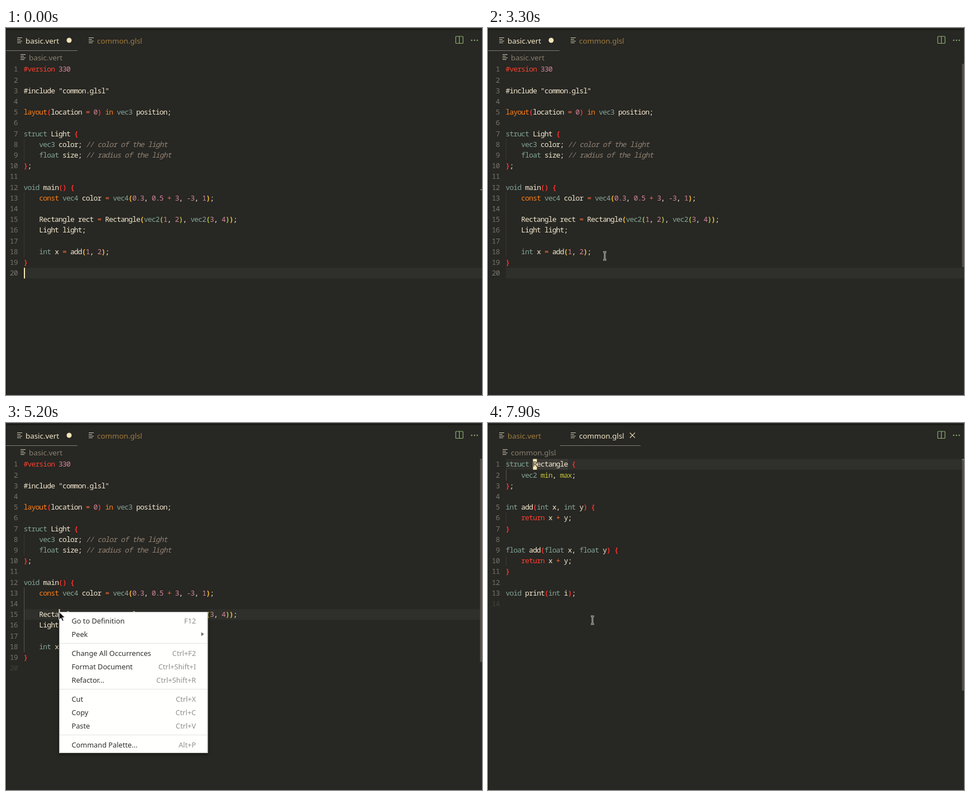
An HTML page that plays this animation: 852x657 px, repeating every 8000 ms.

```html
<!DOCTYPE html>
<html lang="en">
<head>
<meta charset="utf-8">
<title>Go to definition</title>
<style>
html, body { margin: 0; width: 100%; height: 100%; overflow: hidden; background: #272723; }
svg { display: block; }
text { white-space: pre; }
/* Tight spacing trails each glyph, so shift left by half of it to centre the cells. */
.code { transform: translateX(-.4px); }
.code text { font: 500 13px "Noto Sans Mono", monospace; letter-spacing: -.86px; fill: #f5ead0; }
.code .num { fill: #78736a; font-weight: 400; text-anchor: end; }
.code .dim { fill: #43413b; }
.code .under { fill: #272723; }
.ui { font: 13.35px "Noto Sans", sans-serif; }
.item { font: 12.75px "Noto Sans", sans-serif; fill: #2f2f2d; }
.key { fill: #8f8f8d; text-anchor: end; }
.active { fill: #f5e8c8; }
.idle { fill: #a07c3c; }
.crumb { fill: #8a8070; }
.type { fill: #83a598; }
.word { fill: #fe8019; }
.flow { fill: #fb4030; }
.call { fill: #c5c83a; }
.lit { fill: #d3869b; }
.op { fill: #fb6a3a; }
.note { fill: #928374; font-style: italic; font-weight: 400; }
.b0 { fill: #f5302a; }
.b1 { fill: #fabd2f; }
.b2 { fill: #a9c23c; }
.b0, .b1, .b2 { font-weight: 600; }
.edge { fill: #151513; }
.row { fill: #2f2f2b; }
.same { fill: #3b3a36; }
.pair { fill: #665c54; }
.guide { fill: #3a3934; }
.bright { fill: #5b5850; }
.caret { fill: #fbe9b5; }
.mark { fill: #7f7b70; }
.bar { fill: #57504a; }

.doc1, .doc2, .before, .after, .blink, .blink2, .bar1, .menu, .hover, .closed, .ibeam, .line15 {
  animation: 8s step-end infinite;
}
.doc1 { animation-name: doc1; }
.doc2 { animation-name: doc2; }
.before { animation-name: before; }
.after { animation-name: after; }
.blink { animation-name: blink; }
.blink2 { animation-name: blink2; }
.line15 { animation-name: line15; }
.bar1 { animation-name: bar; }
.menu { animation-name: menu; }
.hover { animation-name: hover; }
.closed { animation-name: closed; }
.ibeam { animation-name: ibeam; }
.pointer { animation: move 8s step-end infinite; }

@keyframes doc1 { 0% { opacity: 1 } 87.5% { opacity: 0 } }
@keyframes doc2 { 0% { opacity: 0 } 87.5% { opacity: 1 } }
@keyframes before { 0% { opacity: 1 } 65% { opacity: 0 } }
@keyframes after { 0% { opacity: 0 } 65% { opacity: 1 } }
@keyframes blink {
  0%, 6.25%, 17.5%, 31.25%, 43.75%, 55% { opacity: 1 }
  1.25%, 11.25%, 25%, 37.5%, 50%, 61.25% { opacity: 0 }
}
@keyframes blink2 { 0%, 98.75% { opacity: 1 } 93.75% { opacity: 0 } }
@keyframes line15 { 0%, 71.25% { opacity: 0 } 65% { opacity: 1 } }
@keyframes bar { 0%, 86.25% { opacity: 0 } 25% { opacity: 1 } }
@keyframes menu { 0%, 86.25% { opacity: 0 } 65% { opacity: 1 } }
@keyframes hover { 0% { opacity: 0 } 70% { opacity: 1 } }
@keyframes closed { 0% { opacity: 0 } 86.25% { opacity: 1 } }
@keyframes ibeam { 0%, 65% { opacity: 0 } 25%, 86.25% { opacity: 1 } }
@keyframes move {
  0% { transform: translate(205px, 652px) }
  25% { transform: translate(205px, 652px); animation-timing-function: steps(2) }
  27.5% { transform: translate(205px, 630px) }
  30% { transform: translate(205px, 630px); animation-timing-function: steps(3) }
  33.75% { transform: translate(206px, 572px); animation-timing-function: steps(3) }
  37.5% { transform: translate(208px, 446px); animation-timing-function: steps(3) }
  41.25% { transform: translate(209px, 408px) }
  42.5% { transform: translate(209px, 408px); animation-timing-function: steps(3) }
  46.25% { transform: translate(199px, 402px); animation-timing-function: steps(3) }
  50% { transform: translate(164px, 372px); animation-timing-function: steps(3) }
  53.75% { transform: translate(117px, 342px) }
  55% { transform: translate(95px, 338px) }
  66.25% { transform: translate(95px, 338px); animation-timing-function: steps(4) }
  71.25% { transform: translate(118px, 344px); animation-timing-function: steps(4) }
  76.25% { transform: translate(172px, 351px); animation-timing-function: steps(4) }
  81.25%, 100% { transform: translate(187px, 353px) }
}
</style>
</head>
<body>
<svg id="stage" width="852" height="657" viewBox="0 0 852 657"></svg>
<script>
const BASIC = `#version 330

#include "common.glsl"

layout(location = 0) in vec3 position;

struct Light {
    vec3 color; // color of the light
    float size; // radius of the light
};

void main() {
    const vec4 color = vec4(0.3, 0.5 + 3, -3, 1);

    Rectangle rect = Rectangle(vec2(1, 2), vec2(3, 4));
    Light light;

    int x = add(1, 2);
}
`;
const COMMON = `struct Rectangle {
    vec2 min, max;
};

int add(int x, int y) {
    return x + y;
}

float add(float x, float y) {
    return x + y;
}

void print(int i);
`;
const MENU = [
  [354, 'Go to Definition', 'F12'], [378, 'Peek', ''],
  [412, 'Change All Occurrences', 'Ctrl+F2'], [436, 'Format Document', 'Ctrl+Shift+I'],
  [460, 'Refactor...', 'Ctrl+Shift+R'], [494, 'Cut', 'Ctrl+X'], [518, 'Copy', 'Ctrl+C'],
  [542, 'Paste', 'Ctrl+V'], [576, 'Command Palette...', 'Alt+P']
];
const LEFT = 32, CHAR = 6.94, TOP = 64.4, LINE = 19.2, BASE = 14;
const TOKEN = /(?<note>\/\/.*)|(?<type>\b(?:vec\d|float|int|struct|void)\b)|(?<word>\b(?:layout|in|const)\b)|(?<flow>#version|\breturn\b)|(?<call>\b(?:min|max)\b)|(?<lit>-?\b\d[\d.]*|-\d)|(?<op>[=+])|(?<open>[({])|(?<close>[)}])/g;

const rowY = n => TOP + (n - 1) * LINE;
const rect = (x, y, w, h, cls) => `<rect x="${x}" y="${y}" width="${w}" height="${h}" class="${cls}"/>`;
const text = (x, y, s, cls = '') => `<text x="${x}" y="${y}" class="${cls}">${s}</text>`;
const cells = (n, col, count, cls) => rect(LEFT + col * CHAR, rowY(n), count * CHAR, LINE, cls);
const row = n => rect(LEFT, rowY(n), 852 - LEFT, LINE, 'row');
const guide = (from, to, cls = 'guide') => rect(LEFT, rowY(from), 1, (to - from + 1) * LINE, cls);
const group = (cls, ...parts) => `<g class="${cls}">${parts.join('')}</g>`;

function code(source) {
  let depth = 0;
  const lines = source.split('\n');
  return lines.map((line, i) => {
    const y = rowY(i + 1) + BASE;
    const html = line.replace(TOKEN, (s, ...rest) => {
      const kinds = rest.at(-1);
      let cls = Object.keys(kinds).find(k => kinds[k]);
      if (cls === 'open') cls = 'b' + depth++;
      else if (cls === 'close') cls = 'b' + --depth;
      return `<tspan class="${cls}">${s}</tspan>`;
    });
    const last = i === lines.length - 1;
    return text(21, y, i + 1, last ? 'num dim' : 'num') + text(LEFT, y, html);
  }).join('');
}

const icon = (x, y) =>
  `<path transform="translate(${x} ${y})" d="M0 .5h9M0 3.5h6M0 6.5h9M0 9.5h7" stroke="#d0c8b2" stroke-width="1.2"/>`;

const chrome = [
  rect(0, 2, 852, 1.5, 'edge'), rect(0, 0, 1, 657, 'edge'),
  icon(20, 17), icon(148, 17), icon(26, 47),
  `<g fill="none" stroke="#8eb573" stroke-width="1.2"><rect x="805" y="15" width="13" height="12.5" rx="1"/><path d="M811.5 15v12.5"/></g>`,
  ...[833.5, 838.5, 843.5].map(x => `<circle cx="${x}" cy="22" r="1.2" fill="#8eb573"/>`)
];

const basic = group('doc1',
  text(35, 27.5, 'basic.vert', 'ui active'), text(163, 27.5, 'common.glsl', 'ui idle'),
  '<circle cx="113" cy="22" r="4.5" fill="#f3e4ba"/>',
  rect(0, 40, 128, 1, 'mark'), text(41, 57.5, 'basic.vert', 'ui crumb'),
  group('before', row(20), rect(849, 288.5, 3, 2, 'mark')),
  group('after', row(15), rect(849, 228.5, 3, 2, 'mark')),
  group('closed', cells(15, 4, 9, 'same'), cells(15, 21, 9, 'same'),
    cells(12, 12, 1, 'pair'), cells(19, 0, 1, 'pair')),
  guide(8, 9), guide(13, 18), guide(13, 18, 'bright after'),
  group('code', code(BASIC), text(21, rowY(20) + BASE, 20, 'num before')),
  rect(LEFT, rowY(20), 2, LINE, 'caret blink'),
  rect(94.5, rowY(15), 2, LINE, 'caret line15'),
  rect(848.5, 64, 3.5, 364, 'bar bar1')
);

const common = group('doc2',
  text(35, 27.5, 'basic.vert', 'ui idle'), text(163, 27.5, 'common.glsl', 'ui active'),
  '<path d="M254 17.5l9 9m0-9l-9 9" stroke="#ebdbb2" stroke-width="1.2"/>',
  rect(129, 40, 144, 1, 'mark'), text(41, 57.5, 'common.glsl', 'ui crumb'),
  row(1), cells(1, 7, 9, 'same'),
  guide(2, 2, 'bright'), guide(6, 6), guide(10, 10),
  group('code', code(COMMON)),
  group('blink2', cells(1, 7, 1, 'caret'),
    group('code', text(LEFT + 7 * CHAR, rowY(1) + BASE, 'R', 'under'))),
  rect(848.5, 64, 3.5, 415, 'bar'), rect(849, 64.5, 3, 2, 'mark')
);

const menu = group('menu',
  '<rect x="95.5" y="338.5" width="265.5" height="252" fill="#fffffd" stroke="#b9b9b5" style="filter:drop-shadow(0 2px 3px #0008)"/>',
  '<rect class="hover" x="96" y="342" width="264.5" height="24" fill="#e9e9e7"/>',
  ...[394, 476, 558].map(y => `<rect x="96" y="${y}" width="264.5" height="1" fill="#e2e2df"/>`),
  ...MENU.map(([y, name, key]) => text(117.5, y + 4.6, name, 'item') + text(340, y + 4.6, key, 'item key')),
  '<path d="M349.5 374.5l5 3.5-5 3.5z" fill="#6f6f6d"/>'
);

const beam = 'M-3-7h2q1 0 1 1q0-1 1-1h2M0-6v12M-3 7h2q1 0 1-1q0 1 1 1h2';
const pointer = group('pointer',
  `<g class="ibeam" fill="none"><path d="${beam}" stroke="#f4f4f0" stroke-width="2.6"/><path d="${beam}" stroke="#151513" stroke-width="1"/></g>`,
  '<path class="menu" d="M0 0v14.5l3.4-3.2 2.4 5.4 2.6-1.1-2.4-5.2h4.6z" fill="#111" stroke="#fff" stroke-width="1"/>'
);

document.getElementById('stage').innerHTML =
  chrome.join('') + basic + common + menu + pointer;
</script>
</body>
</html>
```
